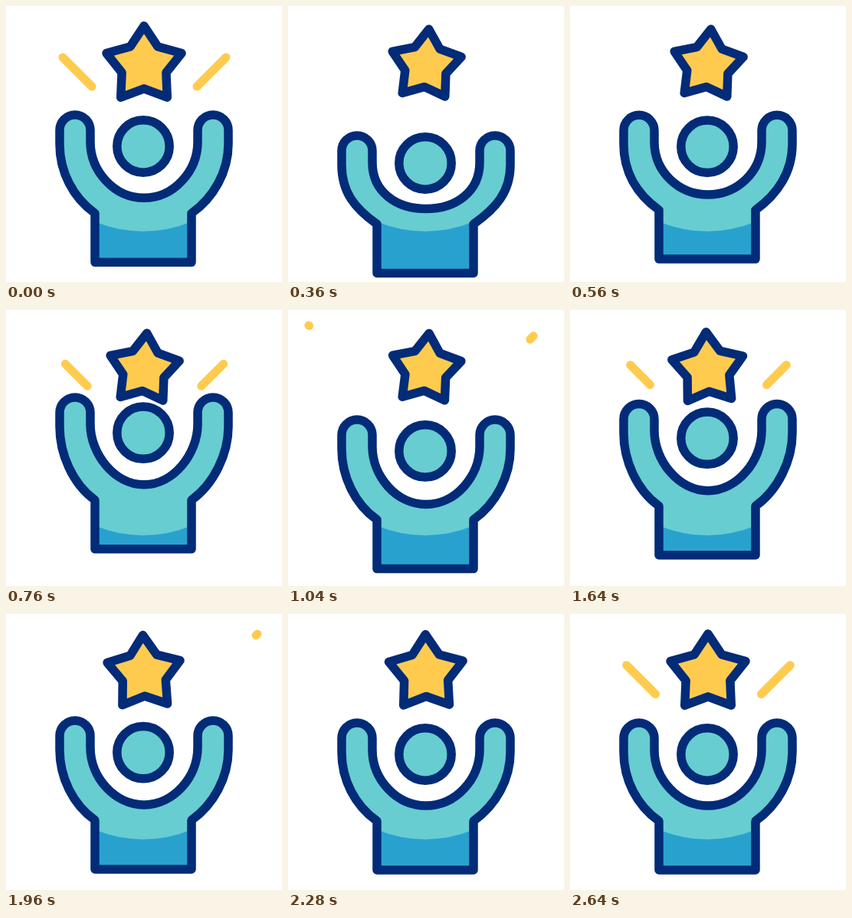
Recreate the animation shown at these times as an HTML page. Size 360x360 px, loop 2680 ms.

```html
<!DOCTYPE html>
<html lang="en">
<head>
<meta charset="utf-8">
<title>Reach for the star</title>
<style>
  html, body { margin: 0; width: 100%; height: 100%; overflow: hidden; background: #fff; }
  svg { display: block; width: 100vw; height: 100vh; }
  .line { stroke: #022b78; stroke-width: 11.5; stroke-linejoin: round; }
  .ray { stroke: #ffcb4f; stroke-width: 11; stroke-linecap: round; }
</style>
</head>
<body>
<svg viewBox="0 0 360 360">
  <clipPath id="clip"><path id="mask"/></clipPath>
  <path id="left" class="ray"/>
  <path id="right" class="ray"/>
  <path id="fill" fill="#29a1cf"/>
  <path d="M0 0H360V281H243Q179 307 115 281H0Z" fill="#67cdd1" clip-path="url(#clip)"/>
  <path id="outline" class="line" fill="none"/>
  <circle id="head" class="line" cx="179" r="34.2" fill="#67cdd1"/>
  <path id="star" class="line" fill="#ffcb4f"/>
</svg>
<script>
const LOOP = 2680, STEP = 40, RAY_LOOP = LOOP / 3;
const FIRST = 350, BEAT = 430;           // crouch, then one swing per beat
const JUMP = [0, 1, -1.05, 0.6, -0.72];  // down is positive, then rest
const TILT = [0, 4.5, 4.5, 5, -3, -1.5]; // star angle in degrees

const $ = id => document.getElementById(id);
const setPath = (id, d) => $(id).setAttribute("d", d);
const mix = (a, b, u) => a + (b - a) * u;

// Eases from one pose to the next, one per beat
function swing(poses, t) {
  const n = Math.min(t / FIRST, 1) + Math.max(t - FIRST, 0) / BEAT;
  const i = Math.floor(n), pose = k => poses[k] || 0;
  return mix(pose(i), pose(i + 1), (1 - Math.cos(Math.PI * (n - i))) / 2);
}

function bodyPath(hand, base) {
  const h = 162 + hand, hip = 270 + base, foot = 334 + base, dip = 250 + base;
  const outer = h + 18, inner = h + 15;
  return `M116 ${foot}V${hip}C87 ${hip - 20.6} 70 ${outer + 36} 70 ${outer}` +
    `V${h}a20 20 0 0 1 40 0V${inner}` +
    `C110 ${inner + 38.6} 141.4 ${dip} 180 ${dip}` +
    `S250 ${inner + 38.6} 250 ${inner}V${h}a20 20 0 0 1 40 0V${outer}` +
    `C290 ${outer + 36} 271 ${hip - 20.6} 242 ${hip}V${foot}Z`;
}

function starPath(turn) {
  const radius = 51.5 - 0.9 * Math.abs(turn);
  const points = Array.from({ length: 10 }, (_, i) => {
    const a = (turn + i * 36 - 90) * Math.PI / 180;
    const r = i % 2 ? radius * 0.59 : radius;
    return `${180 + r * Math.cos(a)} ${77.5 + r * Math.sin(a)}`;
  });
  return `M${points.join("L")}Z`;
}

// A dash grows from its middle, then flies to the corner and shrinks away
function rayPath(p, flight, flip) {
  const grow = (p - 0.76) / 0.24, fly = p / flight;
  if (grow < 0 && fly >= 1) return "";
  const half = 19 * (grow >= 0 ? 1 - (1 - grow) ** 3 : (1 - fly) ** 2);
  const mid = grow >= 0 ? mix(91, 93, grow) : mix(93, 17, fly);
  const end = x => `${flip ? 361 - x : x} ${x - 7}`;
  return `M${end(mid + half)}L${end(mid - half)}`;
}

function draw(t) {
  const jump = swing(JUMP, t), push = swing(JUMP, t + 30);
  const shape = bodyPath(27 * jump, 18 * push - 3 * push * push);
  for (const id of ["mask", "fill", "outline"]) setPath(id, shape);
  $("head").setAttribute("cy", 183 + 22 * jump);
  setPath("star", starPath(swing(TILT, t)));
  const p = t % RAY_LOOP / RAY_LOOP;
  setPath("left", rayPath(p, 0.19, false));
  setPath("right", rayPath(p, 0.25, true));
}

const start = performance.now();
function tick() {
  const t = (performance.now() - start) % LOOP;
  draw(Math.floor(t / STEP) * STEP);
  requestAnimationFrame(tick);
}
tick();
</script>
</body>
</html>
```
